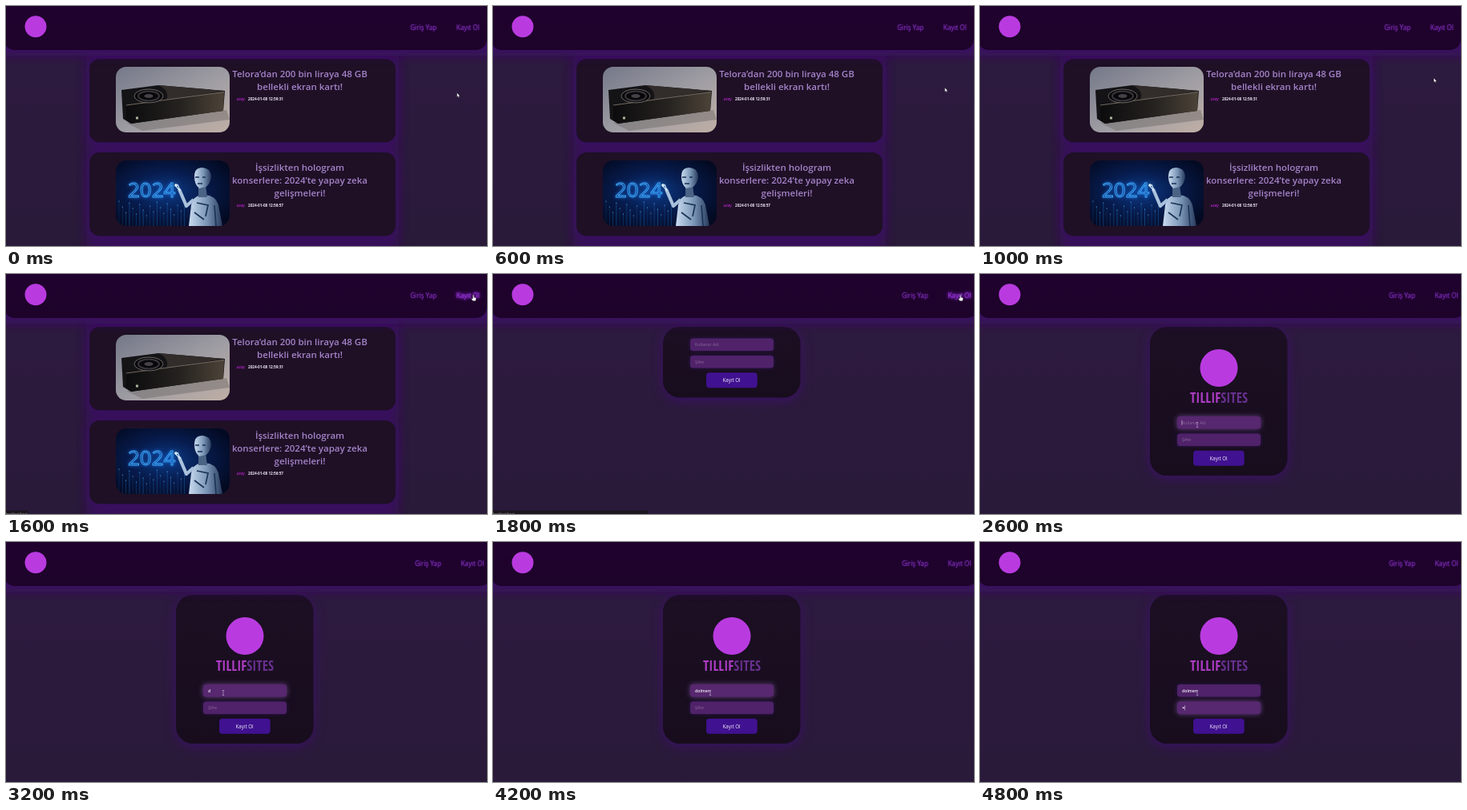
An HTML page that plays this animation: 600 by 300 pixels, repeating every 5 s.

```html
<!DOCTYPE html>
<html lang="tr">
<head>
<meta charset="utf-8">
<title>Kayıt</title>
<style>
html, body { margin: 0; width: 100%; height: 100%; overflow: hidden; background: #2d1b3d; }
svg { display: block; width: 100vw; height: 100vh; font-family: "Open Sans", "Noto Sans", sans-serif; }
.glow { filter: drop-shadow(0 3px 7px #3a0f66); }
.title { font-size: 11.5px; font-weight: 600; fill: #a583c9; text-anchor: middle; }
.meta { font-size: 4.65px; font-weight: 700; fill: #eee4f4; }
.user { font-weight: 600; fill: #b824cc; }
.nav { font-size: 8.15px; fill: #8232b8; filter: drop-shadow(0 0 1px #5c1694); }
.nav.hover { fill: #8d3ccb; filter: drop-shadow(0 0 1px #9a2be0) drop-shadow(0 0 2px #8a1fd0); }
.field { fill: #4f2269; filter: drop-shadow(0 0 2px #301456); }
.field.focus { fill: #57276f; filter: drop-shadow(0 0 3px #6a4288); }
.hint { font-size: 5.3px; fill: #8d6a9c; }
.typed { font-size: 5.2px; font-weight: 600; fill: #f4eef8; }
.send { font-size: 6.2px; fill: #f2ecfb; text-anchor: middle; }
.brand { font-family: "Open Sans Condensed", "Open Sans", sans-serif; font-stretch: 75%; font-weight: 700; text-anchor: middle; }
</style>
</head>
<body>
<svg id="stage" viewBox="0 0 600 300" preserveAspectRatio="none">
  <defs>
    <linearGradient id="bg" x2="0" y2="1"><stop stop-color="#2e1a41"/><stop offset="1" stop-color="#2a1a39"/></linearGradient>
    <linearGradient id="bar" x2="0" y2="1"><stop stop-color="#210230"/><stop offset="1" stop-color="#1d032a"/></linearGradient>
    <linearGradient id="panel" x2="0" y2="1"><stop stop-color="#1c0f23"/><stop offset="1" stop-color="#170d1d"/></linearGradient>
    <linearGradient id="wall" x2="1" y2="1"><stop stop-color="#747889"/><stop offset=".55" stop-color="#a09ea4"/><stop offset="1" stop-color="#c0afa5"/></linearGradient>
    <linearGradient id="metal" x2="1" y2="0"><stop stop-color="#0c0c0e"/><stop offset=".55" stop-color="#25221f"/><stop offset="1" stop-color="#4c4338"/></linearGradient>
    <radialGradient id="night" cx=".45" cy=".48" r=".65"><stop stop-color="#0c3a86"/><stop offset=".5" stop-color="#071b4c"/><stop offset="1" stop-color="#030a22"/></radialGradient>
    <linearGradient id="steel" x2="1" y2="0"><stop stop-color="#c9dcf0"/><stop offset=".55" stop-color="#7893b4"/><stop offset="1" stop-color="#26395b"/></linearGradient>
    <filter id="soft" x="-10%" y="-100%" width="120%" height="300%"><feGaussianBlur stdDeviation="6"/></filter>
    <clipPath id="pic1"><rect x="137" y="76" width="142" height="82" rx="13"/></clipPath>
    <clipPath id="pic2"><rect x="137" y="193" width="142" height="82" rx="13"/></clipPath>
  </defs>
  <rect width="600" height="300" fill="url(#bg)"/>

  <g id="feed">
    <rect x="100" y="58" width="390" height="260" fill="#3a0f60" opacity=".7" filter="url(#soft)"/>
    <g class="glow" fill="#1f1026">
      <rect x="104" y="66" width="382" height="104.5" rx="13"/>
      <rect x="104" y="183" width="382" height="104.5" rx="13"/>
      <rect x="104" y="300" width="382" height="104.5" rx="13"/>
    </g>
    <g clip-path="url(#pic1)">
      <rect x="137" y="76" width="142" height="82" fill="url(#wall)"/>
      <path d="M150 146L275 130L279 142L170 156Z" fill="#6c6665" opacity=".45"/>
      <path d="M144 105L190 99L273 106L271 131L156 147L146 141Z" fill="#141316"/>
      <path d="M190 99L273 106L200 117Q205 106 190 99Z" fill="#322d2b"/>
      <path d="M150 124L272 107.5L271 131L156 147L150 143Z" fill="url(#metal)"/>
      <path d="M150 124L272 107.5" stroke="#8d8174" stroke-width=".8"/>
      <ellipse cx="178" cy="112.5" rx="18" ry="8.5" fill="#08080a" stroke="#77716e" stroke-width=".9"/>
      <ellipse cx="178" cy="112.5" rx="13" ry="6" fill="none" stroke="#37343a" stroke-width="2"/>
      <ellipse cx="178" cy="112.5" rx="5.5" ry="2.6" fill="#454147"/>
      <rect x="162" y="138.5" width="3" height="3" fill="#a9b69c"/>
    </g>
    <g clip-path="url(#pic2)">
      <rect x="137" y="193" width="142" height="82" fill="url(#night)"/>
      <g id="rain" stroke="#2b86dc" stroke-width=".6" fill="#58b8ff"></g>
      <g font-size="26" fill="none" stroke="#45b2ff" stroke-width=".9" style="filter:drop-shadow(0 0 2px #1a7cff)">
        <text x="152" y="239">2024</text>
      </g>
      <path d="M228 275L231 249Q232 239 243 236L254 237Q265 241 266 254L270 275Z" fill="url(#steel)"/>
      <path d="M234 242L225 250L216 229" fill="none" stroke="#a9c1dc" stroke-width="4.2" stroke-linejoin="round"/>
      <path d="M217 231L211 224M217 230L214 223" stroke="#d5e7f8" stroke-width="1.3"/>
      <path d="M240 224H249L251 239H240Z" fill="#4b6384"/>
      <path d="M235 213Q235 202 245 202Q256 203 256 214Q255 221 250 226L241 228Q235 223 235 213Z" fill="url(#steel)"/>
      <path d="M236 214H241M245 214H249M239 222H245" stroke="#173055" stroke-width="1.3"/>
      <path d="M238 246L252 249L249 263M260 249L262 275M235 258L247 267" fill="none" stroke="#1c3558" stroke-width="1.7"/>
      <circle cx="212" cy="224" r="1.8" fill="#e4f7ff" style="filter:drop-shadow(0 0 3px #54c4ff)"/>
    </g>
    <text class="title"><tspan x="366.5" y="88.5">Telora’dan 200 bin liraya 48 GB</tspan><tspan x="366.5" y="104.5">bellekli ekran kartı!</tspan></text>
    <text class="title"><tspan x="366.5" y="206">İşsizlikten hologram</tspan><tspan x="366.5" y="222">konserlere: 2024’te yapay zeka</tspan><tspan x="366.5" y="238">gelişmeleri!</tspan></text>
    <g class="meta">
      <text class="user" x="287.5" y="117.7">uzay</text><text x="302" y="117.7">2024-01-08 12:59:31</text>
      <text class="user" x="287.5" y="250.7">uzay</text><text x="302" y="250.7">2024-01-08 12:56:57</text>
    </g>
  </g>

  <g id="join">
    <rect id="card" class="glow" x="212" y="66" width="171.5" height="186" rx="21" fill="url(#panel)"/>
    <g id="mark">
      <circle cx="298" cy="117.5" r="23.5" fill="#b93be0"/>
      <text id="brand" class="brand" x="298" y="160.5" font-size="18"><tspan fill="#ad3cc4">TILLIF</tspan><tspan fill="#67308f">SITES</tspan></text>
    </g>
    <g id="form">
      <rect id="nameBox" class="field" x="246" y="80.5" width="104" height="15.5" rx="3.5"/>
      <rect id="passBox" class="field" x="246" y="102" width="104" height="15.5" rx="3.5"/>
      <text id="nameHint" class="hint" x="252" y="90.2">Kullanıcı Adı</text>
      <text id="passHint" class="hint" x="252" y="111.7">Şifre</text>
      <text id="nameText" class="typed" x="252" y="90"></text>
      <circle id="dot" cx="253.6" cy="109.8" r="1" fill="#f4eef8"/>
      <rect id="caret" width=".6" height="6" fill="#e4d8ee"/>
      <rect x="266" y="123.3" width="63.7" height="19" rx="4" fill="#401190"/>
      <text class="send" x="297.6" y="135">Kayıt Ol</text>
    </g>
  </g>

  <rect x="-30" y="30" width="660" height="32" fill="#3c1067" opacity=".85" filter="url(#soft)"/>
  <rect id="header" x="-3" y="-20" height="75" rx="14" fill="url(#bar)"/>
  <circle cx="37" cy="25.7" r="13.5" fill="#b93be0"/>
  <g id="links"><text class="nav" x="504.2" y="30">Giriş Yap</text><text id="joinLink" class="nav" x="561.7" y="30">Kayıt Ol</text></g>

  <g id="status">
    <rect id="statusBox" y="295.5" height="5" fill="#1b1520"/>
    <text x="0" y="300.6" font-size="4" fill="#b5a890">localhost/kayit</text>
  </g>

  <g id="pointer">
    <path id="arrow" d="M0 0V5.3L1.2 4.2L2.1 6L3 5.6L2.2 3.9H3.8Z" fill="#fff" stroke="#1a1020" stroke-width=".4"/>
    <path id="hand" d="M-.8 0Q0-1 .8 0V2.6L3 3.3Q3.8 3.6 3.5 4.6L2.8 7.3H-.7L-2.6 4.6Q-2.5 3.5-.8 4.3Z" fill="#fff" stroke="#1a1020" stroke-width=".5"/>
    <path id="beam" d="M-1.2-3H1.2M0-3V3M-1.2 3H1.2" fill="none" stroke="#c4b4d0" stroke-width=".6"/>
  </g>
</svg>
<script>
const LOOP = 5000, STEP = 200, NAME = "dolmen";
const $ = id => document.getElementById(id);
const show = (id, on) => $(id).style.display = on ? "" : "none";
const set = (id, attrs) => Object.entries(attrs).forEach(([k, v]) => $(id).setAttribute(k, v));
const within = (t, a, b) => t >= a && t < b;

// time, x, y
const PATH = [
  [0, 562.5, 108.5], [400, 563, 107], [600, 563.5, 102], [1000, 566, 90],
  [1400, 583, 26.5], [1800, 583, 26.5], [2000, 459.5, 51.5], [2400, 285, 181],
  [2600, 271, 188.5], [LOOP, 271, 188.5]
];

function pointerAt(t) {
  const i = PATH.findIndex(p => p[0] > t);
  const [t0, x0, y0] = PATH[i - 1], [t1, x1, y1] = PATH[i];
  const k = (t - t0) / (t1 - t0);
  return [x0 + (x1 - x0) * k, y0 + (y1 - y0) * k];
}

function drawRain() {
  let out = "";
  for (let i = 0; i < 20; i++) {
    const x = 141 + i * 4.3, top = 244 + (i * 7) % 19;
    out += `<path d="M${x} ${top}V275" opacity="${.25 + (i % 4) * .13}"/><circle cx="${x}" cy="${top}" r=".6" stroke="none"/>`;
  }
  $("rain").innerHTML = out;
}

function fitBrand() {
  const width = $("brand").getComputedTextLength();
  set("brand", { "font-size": 18 * Math.min(1, 72 / width) });
}

function render(t) {
  const joining = t >= 1800, loaded = t >= 2000;
  const hover = within(t, 1400, 2000);
  const nameFocus = within(t, 2600, 4400), passFocus = t >= 4400;
  const count = t < 3200 ? 0 : Math.min(NAME.length, Math.floor((t - 3200) / STEP) + 1);

  show("feed", !joining);
  show("join", joining);
  show("mark", loaded);
  set("card", { height: loaded ? 186 : 88.5 });
  set("form", { transform: `translate(0 ${loaded ? 97.5 : 0})` });
  set("header", { width: joining ? 609 : 603 });
  set("links", { transform: `translate(${joining ? 5.7 : 0} 0)` });
  $("joinLink").classList.toggle("hover", hover);

  $("nameBox").classList.toggle("focus", nameFocus);
  $("passBox").classList.toggle("focus", passFocus);
  $("nameText").textContent = NAME.slice(0, count);
  show("nameHint", !count);
  show("passHint", t < 4800);
  show("dot", t >= 4800);
  show("caret", within(t, 2600, 3000) || passFocus);
  set("caret", { x: t >= 4800 ? 255.4 : 251.6, y: passFocus ? 106.8 : 85.3 });

  show("status", within(t, 1400, 2200));
  set("statusBox", { width: joining ? 193 : 28 });

  const [x, y] = pointerAt(t);
  set("pointer", { transform: `translate(${x} ${y})` });
  show("hand", hover);
  show("beam", t >= 2400);
  show("arrow", !hover && t < 2400);
}

function tick(now) {
  const t = now % LOOP;
  render(Math.floor(t / STEP) * STEP);
  requestAnimationFrame(tick);
}

drawRain();
fitBrand();
render(0);
requestAnimationFrame(tick);
</script>
</body>
</html>
```
